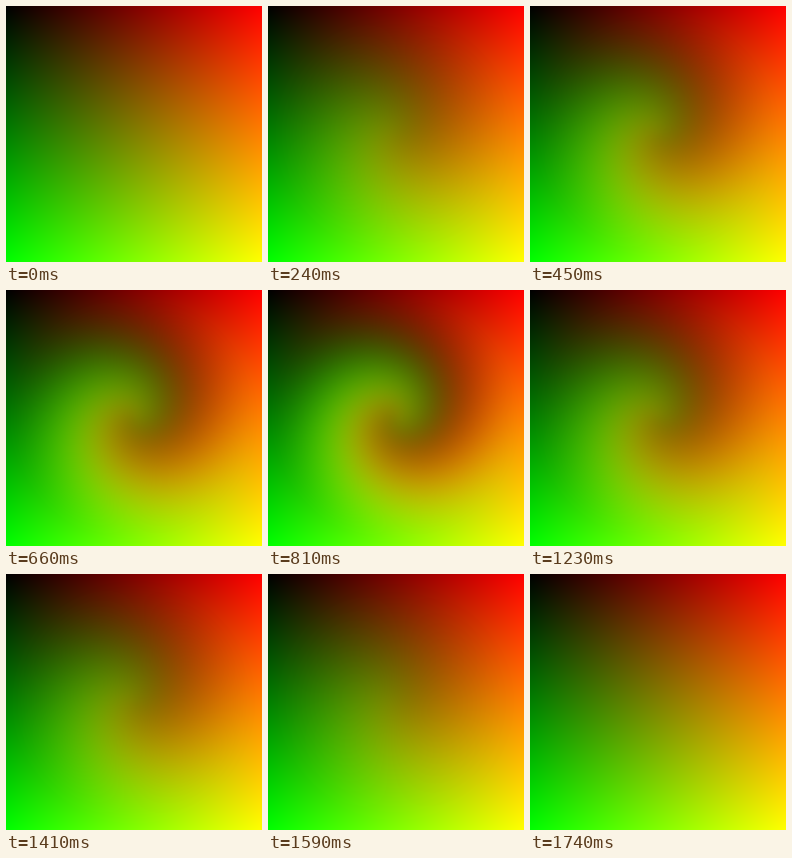
Recreate the animation shown at these times as an HTML page with a canvas. Size 256x256 px, loop 1.77 s.

```html
<!DOCTYPE html>
<html>
<head>
<meta charset="utf-8">
<style>
html, body { margin: 0; width: 100%; height: 100%; overflow: hidden; background: #000; }
canvas { display: block; width: 100vw; height: 100vh; }
</style>
</head>
<body>
<canvas id="stage" width="256" height="256"></canvas>
<script>
const SIZE = 256, MID = (SIZE - 1) / 2, RADIUS = SIZE / 2;
const STEP_MS = 30, PEAK = 29, STEPS = 2 * PEAK + 1;
const DEGREES_PER_STEP = 8;

const ctx = document.getElementById('stage').getContext('2d');
const image = ctx.createImageData(SIZE, SIZE);
let shown = -1;

// Red grows with x and green with y; the twist fades out towards the rim.
function drawSwirl(degrees) {
  const twist = degrees * Math.PI / 180;
  for (let y = 0, i = 0; y < SIZE; y++) {
    for (let x = 0; x < SIZE; x++, i += 4) {
      const dx = x - MID, dy = y - MID;
      const fade = Math.max(0, 1 - Math.hypot(dx, dy) / RADIUS);
      const angle = twist * fade * fade;
      const cos = Math.cos(angle), sin = Math.sin(angle);
      image.data[i] = MID + cos * dx + sin * dy;
      image.data[i + 1] = MID - sin * dx + cos * dy;
      image.data[i + 3] = 255;
    }
  }
  ctx.putImageData(image, 0, 0);
}

function tick() {
  const step = Math.floor(performance.now() / STEP_MS) % STEPS;
  if (step !== shown) {
    shown = step;
    drawSwirl(DEGREES_PER_STEP * (PEAK - Math.abs(PEAK - step)));
  }
  requestAnimationFrame(tick);
}
tick();
</script>
</body>
</html>
```
